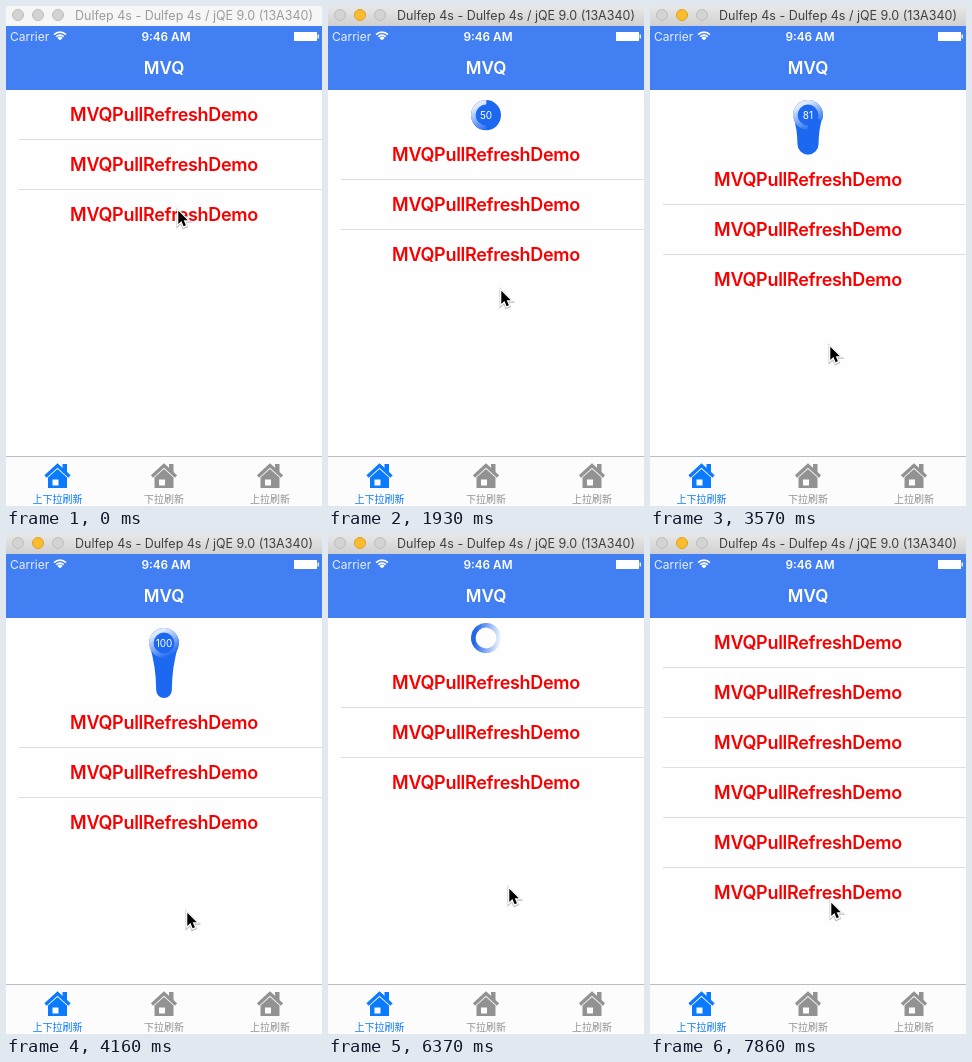
Animation, 316 px wide and 500 px high, one loop 8000 ms. Source, as an HTML page with a canvas:

```html
<!DOCTYPE html>
<html lang="zh">
<head>
<meta charset="utf-8">
<title>Pull to refresh</title>
<style>
html, body { margin: 0; width: 316px; height: 500px; overflow: hidden; background: #fefefe; }
canvas { display: block; }
</style>
</head>
<body>
<canvas id="stage" width="316" height="500"></canvas>
<script>
const ctx = document.getElementById('stage').getContext('2d');
const LOOP = 8000, STEP = 148.3;
const NAV_BOTTOM = 84, ROW = 50, REST = 40, CENTER = 158, RADIUS = 15;
const BLUE = '#417ff3', DROP = '#1c68f0', TINT = '#0a7aff', GRAY = '#929292';
const SANS = 'Inter, "Liberation Sans", sans-serif';
const CJK = '"Noto Sans CJK SC", "Noto Sans CJK", sans-serif';

// [step, x, y] of the pointer
const POINTER = [[0, 172, 204], [1, 172, 194], [7, 172, 194], [9, 171, 236], [14, 174, 296],
  [18, 177, 308], [22, 179, 328], [24, 180, 340], [29, 181, 388], [31, 181, 388],
  [32, 181, 386], [35, 181, 354], [46, 181, 354], [49, 181, 368]];
// [step, list offset, spinner centre] after the finger lets go
const RELEASE = [[30, 60, 106.5], [31, 46, 105], [32, 41, 104], [33, REST, 104],
  [51, REST, 104], [52, 8, 104], [53, 0, 104]];

function sample(keys, n) {
  const i = keys.findIndex(k => k[0] >= n);
  if (i < 0) return keys[keys.length - 1];
  if (i === 0) return keys[0];
  const a = keys[i - 1], b = keys[i], u = (n - a[0]) / (b[0] - a[0]);
  return a.map((v, j) => v + (b[j] - v) * u);
}

function rubberBand(distance) {
  const d = Math.max(0, distance) * 0.55;
  return d / (1 + d / 480);
}

function rect(x, y, w, h, fill) {
  ctx.fillStyle = fill;
  ctx.fillRect(x, y, w, h);
}

function text(str, x, y, font, fill, align = 'center', spacing = 0) {
  ctx.font = font;
  ctx.fillStyle = fill;
  ctx.textAlign = align;
  ctx.letterSpacing = spacing + 'px';
  ctx.fillText(str, x, y);
}

function shape(d, x, y, fill, stroke, width = 1) {
  const path = new Path2D(d);
  ctx.save();
  ctx.translate(x, y);
  if (stroke) {
    ctx.strokeStyle = stroke;
    ctx.lineWidth = width;
    ctx.stroke(path);
  }
  if (fill) {
    ctx.fillStyle = fill;
    ctx.fill(path, 'evenodd');
  }
  ctx.restore();
}

function disc(x, y, r, fill, stroke) {
  ctx.beginPath();
  ctx.arc(x, y, r, 0, 7);
  ctx.fillStyle = fill;
  ctx.fill();
  ctx.lineWidth = 1;
  ctx.strokeStyle = stroke;
  ctx.stroke();
}

function ring(from, sweep, x0, y0, x1, y1, light, dark) {
  const g = ctx.createLinearGradient(x0, y0, x1, y1);
  g.addColorStop(0, light);
  g.addColorStop(1, dark);
  ctx.beginPath();
  ctx.arc(0, 0, 12.7, from, from + sweep);
  ctx.strokeStyle = g;
  ctx.lineWidth = 4.6;
  ctx.stroke();
}

function drawDrop(offset) {
  const stretch = Math.max(0, offset - REST);
  const r = RADIUS - stretch * 0.18;
  const tail = stretch + RADIUS - r;
  const done = Math.min(1, offset / 80);
  ctx.save();
  ctx.translate(CENTER, NAV_BOTTOM + Math.min(offset, REST) - RADIUS);
  ctx.fillStyle = DROP;
  ctx.beginPath();
  ctx.arc(0, 0, RADIUS, Math.PI, 0);
  ctx.quadraticCurveTo(r, tail / 2, r, tail);
  ctx.arc(0, tail, r, 0, Math.PI);
  ctx.quadraticCurveTo(-r, tail / 2, -RADIUS, 0);
  ctx.fill();
  ring(Math.PI / 2, done * Math.PI * 2, -6, -10, 6, 13, '#dfe9fd', DROP);
  text(Math.floor(done * 100 + 0.3), 0, 3.6, '10px ' + SANS, '#fff');
  ctx.restore();
}

function drawSpinner(y, time) {
  ctx.save();
  ctx.translate(CENTER, y);
  ctx.rotate((time - 4712) / 1000 * Math.PI * 2);
  ring(0, Math.PI * 2, -14, 0, 11, 0, '#eef3fe', '#2468ea');
  ctx.restore();
}

function drawList(offset, rows) {
  const top = NAV_BOTTOM + Math.round(offset);
  for (let i = 0; i < rows; i++) {
    const y = top + i * ROW;
    text('MVQPullRefreshDemo', CENTER, y + 31, '600 18px ' + SANS, '#f80000', 'center', -0.3);
    if (i < rows - 1) rect(13, y + 49, 303, 1, '#dedee0');
  }
}

function drawTitleBar(active) {
  const g = ctx.createLinearGradient(0, 0, 0, 20);
  g.addColorStop(0, active ? '#e8e8e8' : '#f6f6f6');
  g.addColorStop(1, active ? '#d0d0d0' : '#f6f6f6');
  rect(0, 0, 316, 20, g);
  [12, 32, 52].forEach((x, i) => {
    const lit = active && i === 1;
    disc(x, 9, 5.5, lit ? '#fbbd2e' : '#d3d3d3', lit ? '#dfa023' : '#bdbdbd');
  });
  text('Dulfep 4s - Dulfep 4s / jQE 9.0 (13A340)', 188, 14, '12.5px ' + SANS, active ? '#404040' : '#9c9c9c');
}

function drawNavBar() {
  rect(0, 20, 316, 64, BLUE);
  text('Carrier', 4, 34.5, '12px ' + SANS, '#e6eefd', 'left');
  text('9:46 AM', 160, 34.5, '600 11.8px ' + SANS, '#fff');
  text('MVQ', CENTER, 68, '600 17px ' + SANS, '#fff');
  [2.2, 5.3, 8.4].forEach((r, i) => {
    ctx.beginPath();
    ctx.arc(54, 34.5, r, -Math.PI * 0.75, -Math.PI * 0.25);
    ctx.lineWidth = i ? 1.7 : 3;
    ctx.strokeStyle = '#fff';
    ctx.stroke();
  });
  rect(288, 26, 23, 9, '#fff');
  rect(311.5, 28.5, 1.5, 4, '#e6eefd');
}

function drawTab(x, label, color) {
  shape('M-12 1.5L0 -9.5L12 1.5', x, 469, null, color, 3.2);
  shape('M5 -11H9.5V-2L5 -6ZM-9.5 2.5L0 -6L9.5 2.5V13H-9.5ZM-5 4.5H1V10.5H-5Z', x, 469, color);
  text(label, x, 496.5, '10px ' + CJK, color);
}

function drawTabBar() {
  rect(0, 450, 316, 50, '#fcfcfc');
  rect(0, 450, 316, 1, '#bcbcbe');
  drawTab(51.5, '上下拉刷新', TINT);
  drawTab(158, '下拉刷新', GRAY);
  drawTab(264, '上拉刷新', GRAY);
}

function drawPointer(x, y) {
  const arrow = 'M.8 1.5V14.6L3.9 11.7L6.1 17L8.4 16L6.2 10.9H10.3Z';
  shape(arrow, x - 0.5, y, null, 'rgba(0,0,0,.25)', 3.6);
  shape(arrow, x - 0.5, y - 0.7, '#000', '#fff', 2.4);
}

function draw(now) {
  const time = now % LOOP;
  const n = Math.floor(time / STEP);
  const [, px, py] = sample(POINTER, n);
  const [, settled, spinnerY] = sample(RELEASE, n);
  const released = n >= 30, loaded = n >= 49;
  const offset = released ? settled : rubberBand(py - 204);

  rect(0, 0, 316, 500, '#fefefe');
  drawList(offset, loaded ? 6 : 3);
  if (!released && offset > 0) drawDrop(offset);
  if (released && !loaded) drawSpinner(spinnerY, n * STEP);
  drawTitleBar(n >= 7);
  drawNavBar();
  drawTabBar();
  drawPointer(Math.round(px), Math.round(py));
}

let start;
function tick(now) {
  start ??= now;
  draw(now - start);
  requestAnimationFrame(tick);
}
requestAnimationFrame(tick);
</script>
</body>
</html>
```
